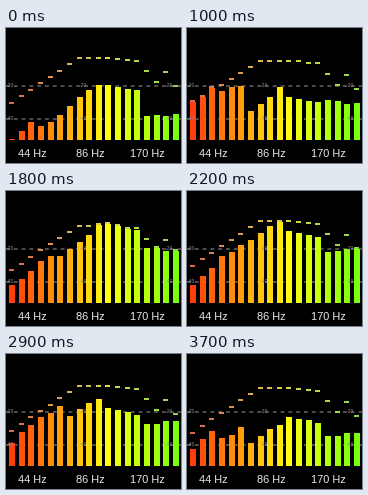
Recreate the animation shown at these times as a matplotlib script. Size 175 by 135 pixels, loop 3800 ms.

```python
import colorsys

import matplotlib.pyplot as plt
import numpy as np
from matplotlib.animation import FuncAnimation
from matplotlib.patches import Rectangle

W, H, DPI = 175, 135, 100
FRAMES, STEP_MS = 38, 100
BANDS, BAR_W, FLOOR, CEILING = 18, 6, 112, 28
PEAK_HOLD, PEAK_FALL = 22, 0.25
PX = 72 / DPI

# Each group of neighbouring bands moves as one:
# (band count, slope per band, mean y of the bar tops at KEY_FRAMES)
KEY_FRAMES = [0, 4, 10, 18, 26, 32, 37]
GROUPS = [
    (3, -8, [104, 80, 67, 86, 87, 73, 87]),
    (3, -4, [92, 67, 60, 67, 52, 64, 79]),
    (4, -7, [67, 43, 71, 46, 34, 73, 80]),
    (4, 2, [58, 47, 73, 38, 45, 67, 64]),
    (4, 0, [88, 66, 74, 58, 61, 76, 81]),
]


def bar_tops(frame):
    tops = []
    for count, slope, levels in GROUPS:
        level = np.interp(frame, KEY_FRAMES, levels, period=FRAMES)
        tops.extend(level + slope * (np.arange(count) - (count - 1) / 2))
    # Small flutter that repeats with the loop
    flutter = 2 * np.sin(2 * np.pi * 5 * frame / FRAMES + phases)
    return np.clip(np.round(tops + flutter), CEILING, FLOOR)


def peak_marks(frame, tops):
    """Peaks follow a fixed contour, sink slowly and jump back up."""
    contour = np.interp(np.arange(BANDS), [0, 3, 7, 10, 13, 15, 16, 17],
                        [74, 54, 29, 29, 32, 53, 43, 57])
    sunk = contour + PEAK_FALL * (frame % PEAK_HOLD)
    return np.minimum(np.round(sunk), tops - 2)


def draw_grid(y, level):
    ax.plot([0, W], [y, y], color="#666666", lw=1.5 * PX, dashes=(2.6, 2.6),
            dash_capstyle="butt", zorder=1)
    for x in (4, 77, 163):
        ax.text(x, y, level, color="#909090", family="DejaVu Sans",
                size=4.5 * PX, ha="center", va="center", zorder=4)


phases = np.random.default_rng(7).uniform(0, 2 * np.pi, BANDS)

fig = plt.figure(figsize=(W / DPI, H / DPI), dpi=DPI, facecolor="black")
ax = fig.add_axes([0, 0, 1, 1])
ax.set(xlim=(0, W), ylim=(H, 0))
ax.axis("off")

draw_grid(57.5, "-20")
draw_grid(90.5, "-40")
for i, text in enumerate(("44 Hz", "86 Hz", "170 Hz")):
    ax.text(26.5 + 57.5 * i, 129, text, color="#e8e8e8", size=11 * PX,
            family="Liberation Sans", ha="center", va="baseline")

bars, peaks = [], []
for band in range(BANDS):
    x = round(3 + 164 * band / (BANDS - 1))
    hue = (12 + 4.8 * band) / 360
    bars.append(Rectangle((x, FLOOR), BAR_W, 0, lw=0, antialiased=False,
                          color=colorsys.hsv_to_rgb(hue, 0.95, 1), zorder=2))
    peaks.append(Rectangle((x, FLOOR), BAR_W - 1, 1.5, lw=0,
                           color=colorsys.hsv_to_rgb(hue, 0.65, 0.85), zorder=3))
for patch in bars + peaks:
    ax.add_patch(patch)


def update(frame):
    tops = bar_tops(frame)
    for bar, peak, top, mark in zip(bars, peaks, tops, peak_marks(frame, tops)):
        bar.set_y(top)
        bar.set_height(FLOOR - top)
        peak.set_y(mark)
    return bars + peaks


anim = FuncAnimation(fig, update, frames=FRAMES, interval=STEP_MS,
                     repeat=True, repeat_delay=0, blit=False)
plt.show()
```
